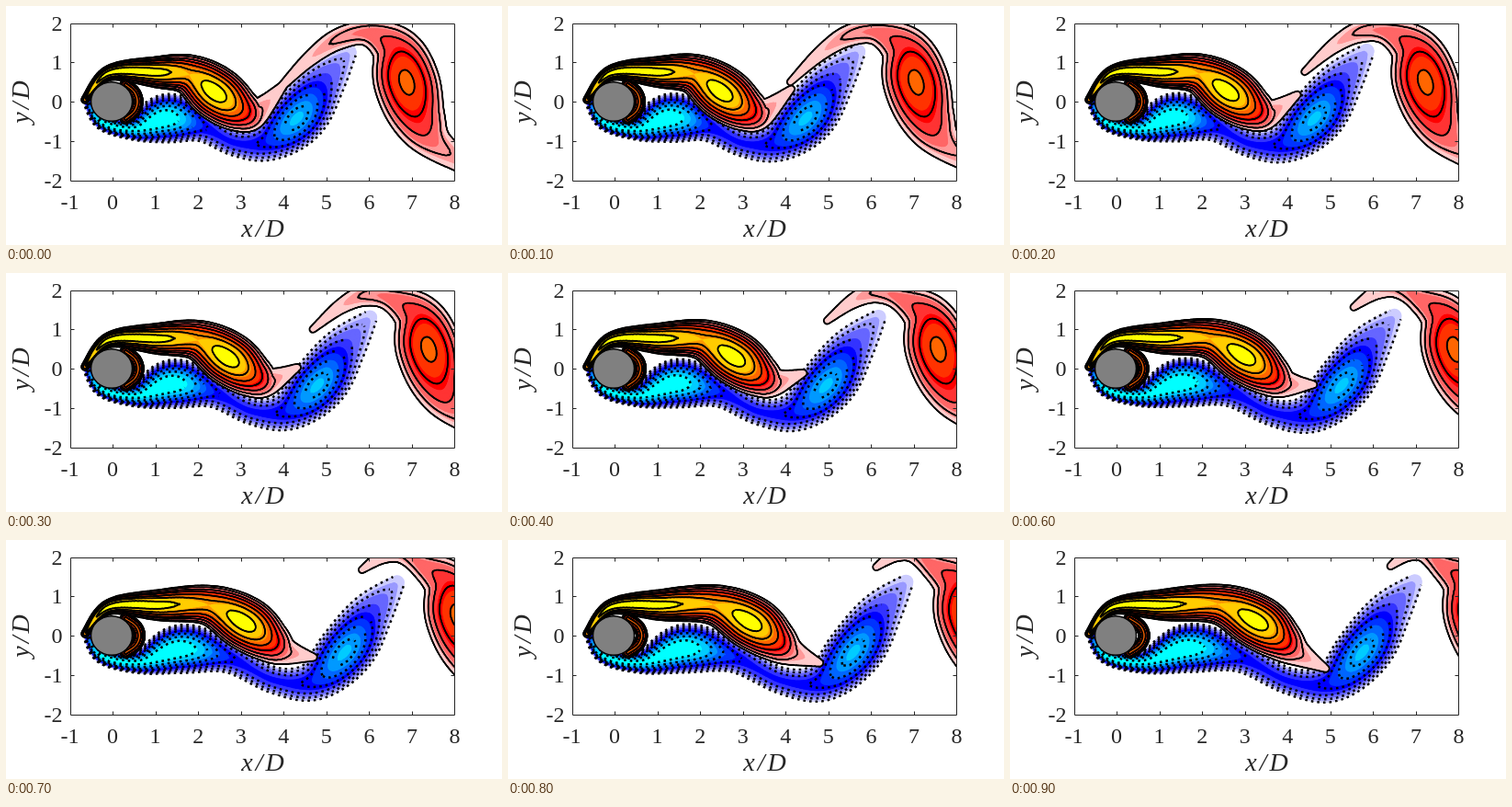
These frames come from a looping animation (540x260 px, 1 s). An HTML page with a canvas:

```html
<!DOCTYPE html>
<html lang="en">
<head>
<meta charset="utf-8">
<title>Vortex shedding</title>
<style>
html, body { margin: 0; width: 100%; height: 100%; overflow: hidden; background: #fff; }
canvas { display: block; }
</style>
</head>
<body>
<canvas id="stage" width="540" height="260"></canvas>
<script>
const ctx = document.getElementById('stage').getContext('2d');
const STEPS = 10, STEP_MS = 100, DETAIL = 16;
const BOX = { x: 70, y: 19, w: 419, h: 171 };
const BODY = { x: 115, y: 104, rx: 22.5, ry: 21.2 };
const INK = '#262626';
const SERIF = '"Liberation Serif", "Times New Roman", serif';

const ramp = (x, from, to) => Math.max(0, Math.min(1, (x - from) / (to - from)));
const smooth = (x, from, to) => { const k = ramp(x, from, to); return k * k * (3 - 2 * k); };
const bump = (x, mid, spread) => Math.exp(-(((x - mid) / spread) ** 2));

// A vortex sheet is a spine of [x, y, half-width, strength] nodes,
// carried downstream by drift(x, t) over the loop, t from 0 to 1.
const nearRed = {
  nodes: [[86,102,4,8], [112,73,8,10.4], [165,72,17,10.1], [200,75,22,8.6], [229,95,30,10.3],
          [254,113,24,6.4], [272,116,16,2.5], [304,84,6,.9]],
  // the vortex rolls forward while its trailing tip folds down
  drift: (x, t) => [40 * t * smooth(x, 150, 230),
                    t * (62 * ramp(x, 250, 300) ** 2 - 6 * ramp(x, 150, 210))]
};
const farRed = {
  nodes: [[294,94,6,.9], [330,58,10,1.5], [362,36,13,2.3], [395,30,15,3], [425,48,27,4.5],
          [436,82,37,6.9], [448,120,31,4.8], [468,150,20,2.6], [515,180,12,1.3]],
  // the torn-off tail is pulled up and catches up with the vortex
  drift: (x, t) => {
    const tail = 1 - ramp(x, 290, 400);
    return [(72 + 50 * tail) * t, -68 * tail * Math.sin(t * Math.PI / 2)];
  }
};
const blueSheet = {
  nodes: [[87,101,4,6], [104,126,8,10], [140,134,12,9.9], [176,122,27,10.7], [213,131,17,5.5],
          [250,149,15,4.8], [285,147,22,5.6], [318,121,31,8.8], [345,84,25,4.2], [374,50,10,1.4]],
  drift: (x, t) => [67 * t * smooth(x, 100, 310),
                    t * (14 * bump(x, 275, 40) - 5 * ramp(x, 130, 180))]
};
// thin layer hugging the lee side of the cylinder
const wakeRed = {
  nodes: [-1, -.5, 0, .5, 1].map(a =>
    [BODY.x + 28 * Math.cos(a), BODY.y + 22 * Math.sin(a), 6, 7]),
  drift: (x, t) => [3 * t * ramp(x, 130, 143), 0]
};

const REDS = [], BLUES = [];
for (let i = 0; i < 10; i++) {
  const fade = Math.max(0, 204 - 51 * i), rise = Math.max(0, 51 * (i - 4));
  REDS.push(`rgb(255,${fade + rise},${fade})`);
  BLUES.push(`rgb(${fade},${fade + rise},255)`);
}

function spline(a, b, c, d, k) {
  return b + .5 * k * (c - a + k * (2 * a - 5 * b + 4 * c - d + k * (3 * (b - c) + d - a)));
}

function sheetAt({ nodes, drift }, t) {
  const moved = nodes.map(([x, y, w, strength]) => {
    const [dx, dy] = drift(x, t);
    return [x + dx, y + dy, w, strength];
  });
  const at = j => moved[Math.max(0, Math.min(moved.length - 1, j))];
  const pts = [];
  for (let s = 0; s <= (moved.length - 1) * DETAIL; s++) {
    const j = Math.floor(s / DETAIL), k = s / DETAIL - j;
    pts.push([0, 1, 2, 3].map(c => spline(at(j - 1)[c], at(j)[c], at(j + 1)[c], at(j + 2)[c], k)));
  }
  return pts;
}

const radius = ([, , w, strength], level) =>
  strength > level ? w * Math.sqrt(1 - level / strength) : 0;

// Fills everything in a sheet stronger than the level.
function paint(pts, level, grow, color) {
  ctx.strokeStyle = color;
  for (let i = 1; i < pts.length; i++) {
    const a = pts[i - 1], b = pts[i];
    const r = (radius(a, level) + radius(b, level)) / 2;
    if (r <= 0 || r + grow <= 0) continue;
    ctx.lineWidth = 2 * (r + grow);
    ctx.beginPath();
    ctx.moveTo(a[0], a[1]);
    ctx.lineTo(b[0], b[1]);
    ctx.stroke();
  }
}

// Dashes both edges of the level's envelope.
function dashEdges(pts, level) {
  ctx.strokeStyle = '#000';
  ctx.lineWidth = 2.5;
  ctx.lineCap = 'butt';
  ctx.setLineDash([2.6, 4]);
  for (const side of [-1, 1]) {
    let open = false;
    ctx.beginPath();
    for (let i = 1; i < pts.length - 1; i++) {
      const a = pts[i - 1], b = pts[i + 1], r = radius(pts[i], level);
      const dx = b[0] - a[0], dy = b[1] - a[1], len = Math.hypot(dx, dy);
      const slope = (radius(b, level) - radius(a, level)) / len;
      if (!r || Math.abs(slope) >= 1) { open = false; continue; }
      const along = -slope * r / len, out = side * r * Math.sqrt(1 - slope * slope) / len;
      const x = pts[i][0] + dx * along - dy * out, y = pts[i][1] + dy * along + dx * out;
      if (open) ctx.lineTo(x, y); else ctx.moveTo(x, y);
      open = true;
    }
    ctx.stroke();
  }
  ctx.setLineDash([]);
  ctx.lineCap = 'round';
}

function drawFlow(t) {
  ctx.save();
  ctx.beginPath();
  ctx.rect(BOX.x, BOX.y, BOX.w, BOX.h);
  ctx.clip();
  ctx.lineCap = 'round';

  const blue = sheetAt(blueSheet, t);
  BLUES.forEach((color, i) => paint(blue, .6 + i, 0, color));
  for (let level = .6; level < 10; level += 1.5) dashEdges(blue, level);

  // colour bands are 1 apart, contour lines 1.5
  const reds = [nearRed, farRed, wakeRed].map(sheet => sheetAt(sheet, t));
  for (let i = 0; i < 20; i++) {
    const level = .6 + i / 2, lined = i % 3 === 0;
    if (!lined && i % 2) continue;
    if (lined) reds.forEach(s => paint(s, level, 1, '#000'));
    reds.forEach(s => paint(s, level, lined ? -1 : 0, REDS[i >> 1]));
  }

  ctx.beginPath();
  ctx.ellipse(BODY.x, BODY.y, BODY.rx, BODY.ry, 0, 0, 2 * Math.PI);
  ctx.fillStyle = '#808080';
  ctx.fill();
  ctx.strokeStyle = '#000';
  ctx.lineWidth = 1.5;
  ctx.stroke();
  ctx.restore();
}

function tick(x, y, dx, dy) {
  ctx.moveTo(x, y);
  ctx.lineTo(x + dx, y + dy);
}

function drawAxes() {
  const { x, y, w, h } = BOX, left = x + .5, top = y + .5;
  ctx.strokeStyle = ctx.fillStyle = INK;
  ctx.lineWidth = 1;
  ctx.font = '24px ' + SERIF;
  ctx.beginPath();
  ctx.rect(left, top, w - 1, h);
  ctx.textAlign = 'center';
  for (let i = 0; i <= 9; i++) {
    const px = x + w * i / 9, line = Math.floor(px) + .5;
    if (i % 9) {
      tick(line, top, 0, 4);
      tick(line, top + h, 0, -4);
    }
    ctx.fillText(i - 1, px - .5, 221);
  }
  ctx.textAlign = 'right';
  for (let i = 0; i <= 4; i++) {
    const py = y + h * i / 4, line = Math.floor(py) + .5;
    if (i % 4) {
      tick(left, line, 4, 0);
      tick(left + w - 1, line, -4, 0);
    }
    ctx.fillText(2 - i, 61.5, Math.floor(py) + 8);
  }
  ctx.stroke();

  ctx.font = 'italic 28px ' + SERIF;
  ctx.textAlign = 'center';
  ctx.letterSpacing = '3px';
  ctx.fillText('x/D', 281, 251);
  ctx.save();
  ctx.translate(25, 103);
  ctx.rotate(-Math.PI / 2);
  ctx.fillText('y/D', 0, 0);
  ctx.restore();
  ctx.letterSpacing = '0px';
}

let shown = -1;
function loop() {
  const step = Math.floor(performance.now() / STEP_MS) % STEPS;
  if (step !== shown) {
    shown = step;
    ctx.fillStyle = '#fff';
    ctx.fillRect(0, 0, 540, 260);
    drawFlow(step / (STEPS - 1));
    drawAxes();
  }
  requestAnimationFrame(loop);
}
loop();
</script>
</body>
</html>
```
